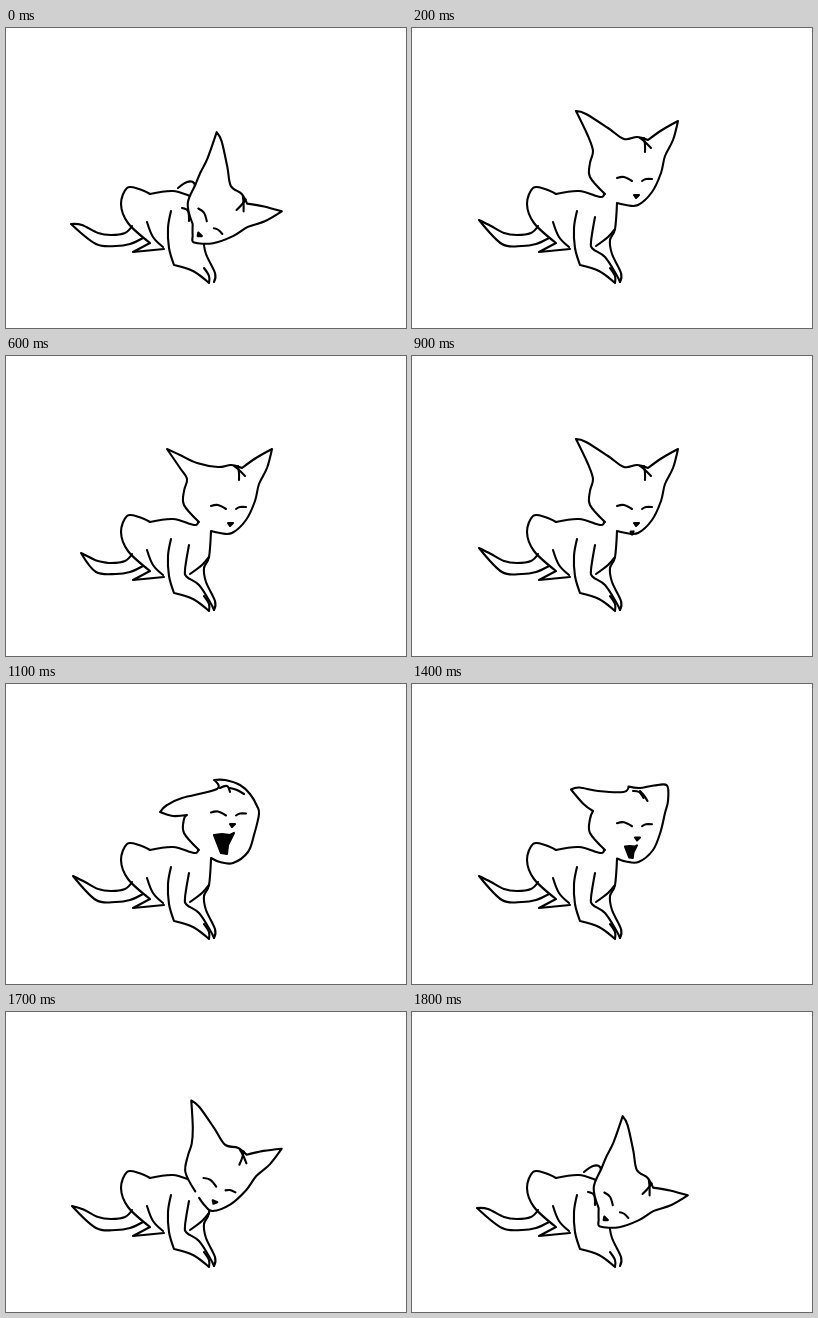
Animation of 400x300 px, one loop 2200 ms. Source, as an HTML page with a canvas:

```html
<!DOCTYPE html>
<html lang="en">
<head>
<meta charset="utf-8">
<title>Sleepy cat</title>
<style>
  html, body { margin: 0; height: 100%; overflow: hidden; background: #fff; }
  canvas { display: block; }
</style>
</head>
<body>
<canvas id="stage" width="400" height="300"></canvas>
<script>
const ctx = document.getElementById('stage').getContext('2d');
const LOOP = 2200, STEP = 100;

// Key points as "x,y"; a trailing "!" marks a sharp corner.
const points = text => text.split(' ').map(p => [...p.replace('!', '').split(',').map(Number), p.endsWith('!')]);
const mix = (a, b, t) => a.map(([x, y, corner], i) =>
  [x + (b[i][0] - x) * t, y + (b[i][1] - y) * t, t < 0.5 ? corner : b[i][2]]);
const shift = (pts, dx, dy) => pts.map(([x, y, corner]) => [x + dx, y + dy, corner]);

// Smooth stroke through the key points.
function curve(pts, fill) {
  const control = (p, before, after, way) => p[2] || !before || !after ? p
    : [p[0] + way * (after[0] - before[0]) / 6, p[1] + way * (after[1] - before[1]) / 6];
  ctx.beginPath();
  ctx.moveTo(pts[0][0], pts[0][1]);
  for (let i = 1; i < pts.length; i++) {
    const [c1x, c1y] = control(pts[i - 1], pts[i - 2], pts[i], 1);
    const [c2x, c2y] = control(pts[i], pts[i - 1], pts[i + 1], -1);
    ctx.bezierCurveTo(c1x, c1y, c2x, c2y, pts[i][0], pts[i][1]);
  }
  if (fill) {
    ctx.fillStyle = fill;
    ctx.fill();
  }
  ctx.stroke();
}

function blob(pts) {
  ctx.beginPath();
  pts.forEach(([x, y]) => ctx.lineTo(x, y));
  ctx.closePath();
  ctx.fillStyle = '#000';
  ctx.fill();
  ctx.stroke();
}

const body = [
  '144,166 133,161 121,160 115,176 122,195 144,215! 127,224! 158,221',
  '141,194 147,209 157,219',
  '165,183 162,200 163,220 168,237! 187,243 203,255! 203,248 198,240',
  '144,166 167,163 188,169 192,166',
  '205,175 203,201 198,212 200,226 209,245 208,254',
].map(points);
const sittingLegs = ['183,189 179,214 181,221 193,229 204,246 208,254', '203,201 196,209 184,218'].map(points);
const sleepingLegs = ['172,160 181,154 188,155 189,164', '176,180 182,183 183,193'].map(points);

const tailTip = { sit: points('79,198 67,192!'), curl: points('87,203 75,197!'), sleep: points('76,197 65,196!') };
const tailTop = points('126,198 119,205 105,207 92,205');
const tailUnder = points('90,216 110,218 124,216 137,210');

const cheek = { sit: points('193,166 178,149 178,135'), sleep: points('212,165 194,154 186,135') };
const leftEar = {
  sit: points('181,123 176,108 164,83! 174,86 196,100 212,111'),
  twitch: points('181,123 174,112 161,93! 174,99 191,107 212,111'),
  yawn: points('181,131! 167,132 154,128! 161,121 176,114 211,105'),
};
const rightEar = {
  sit: points('225,109 236,112! 250,102 266,93! 261,112'),
  yawn: points('208,96! 219,96 234,101 244,110 251,122'),
};
const jaw = {
  sit: points('253,128 249,145 240,164 226,177 214,177 205,175'),
  yawn: points('253,130 248,151 242,168 227,179 214,178 205,174'),
  sleep: points('253,128 249,145 240,164 226,177 220,173 212,165'),
};
const tufts = [
  ['228,110 233,114 239,120', '214,104 221,102 224,108'],
  ['232,110 233,117 233,124', '224,104 231,106 238,110'],
].map(pair => pair.map(points));
const eyes = ['205,150 212,149 220,153', '230,153 234,151 240,151'].map(points);
const nose = points('222,167 227,167 224,170');
const mouth = points('208,151 216,150 224,151 228,149 222,161 221,170 215,169');
const mouthShut = mouth.map(() => [220.5, 180]);

function drawBody(twitch, nod) {
  const tip = mix(mix(tailTip.sit, tailTip.curl, twitch), tailTip.sleep, nod);
  curve([...tailTop, ...tip, ...tailUnder]);
  [...body, ...(nod === 1 ? sleepingLegs : sittingLegs)].forEach(p => curve(p));
}

// The head sinks and turns with nod; ears, eyes and jaw follow yawn.
function drawHead(twitch, nod, yawn, mouthOpen) {
  ctx.save();
  ctx.translate(215 - 5 * nod, 135 + 42 * nod);
  ctx.rotate(nod * Math.PI / 4);
  ctx.translate(-215, -135);
  curve([
    ...mix(cheek.sit, cheek.sleep, nod),
    ...mix(mix(leftEar.sit, leftEar.twitch, twitch), leftEar.yawn, yawn),
    ...mix(rightEar.sit, rightEar.yawn, yawn),
    ...mix(mix(jaw.sit, jaw.yawn, yawn), jaw.sleep, nod),
  ], '#fff');
  tufts.forEach(([up, down]) => curve(mix(up, down, yawn)));
  eyes.forEach(eye => curve(shift(eye, 0, -21.5 * yawn)));
  blob(shift(nose, 2 * yawn, -27 * yawn));
  if (mouthOpen) blob(mix(mouthShut, mouth, mouthOpen));
  ctx.restore();
}

const poses = {
  S: { nod: 1 },
  R: { nod: 0.5 },
  A: {},
  H: { twitch: 0.5 },
  T: { twitch: 1 },
  O: { mouthOpen: 0.15 },
  M: { yawn: 0.5, mouthOpen: 0.6 },
  Y: { yawn: 1, mouthOpen: 1 },
};
const timeline = 'SRAHTHTHAOMYYYMOARSSSS';

ctx.lineWidth = 2.1;
ctx.lineCap = ctx.lineJoin = 'round';

function draw() {
  const step = Math.floor(performance.now() % LOOP / STEP);
  const { twitch = 0, nod = 0, yawn = 0, mouthOpen = 0 } = poses[timeline[step]];
  ctx.fillStyle = '#fff';
  ctx.fillRect(0, 0, 400, 300);
  drawBody(twitch, nod);
  drawHead(twitch, nod, yawn, mouthOpen);
  requestAnimationFrame(draw);
}
draw();
</script>
</body>
</html>
```
